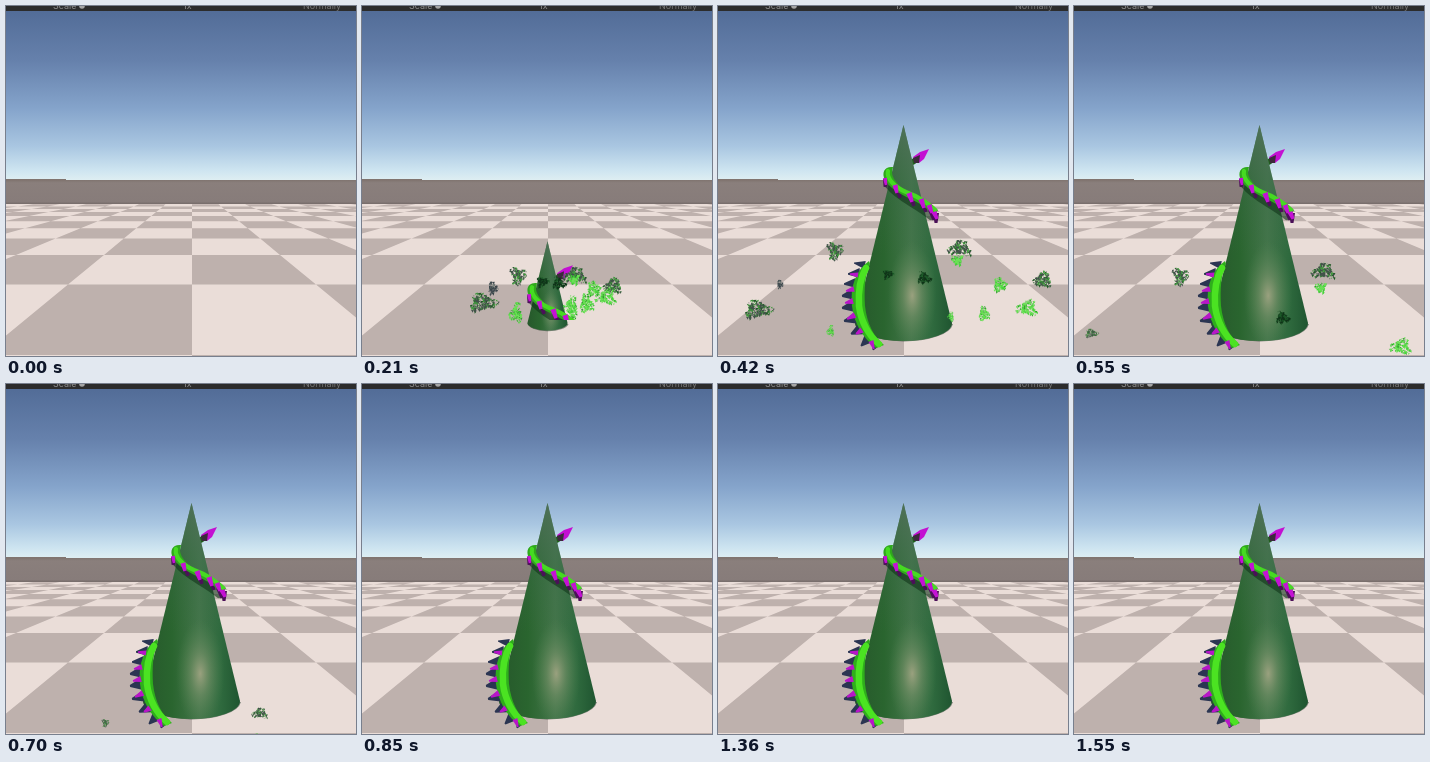
These frames come from a looping animation (350 px wide and 350 px high, 1.58 s). An HTML page:

```html
<!DOCTYPE html>
<html lang="en">
<head>
<meta charset="utf-8">
<title>Thorn cone</title>
<style>
html, body { margin: 0; width: 100%; height: 100%; overflow: hidden; background: #2b2b2b; }
svg { display: block; width: 100vw; height: 100vh; }
text { font: 9px Inter, Arial, sans-serif; fill: #8e8e8e; }
</style>
</head>
<body>
<svg viewBox="0 0 350 350">
  <defs>
    <linearGradient id="sky" x1="0" y1="0" x2="0" y2="1">
      <stop offset="0" stop-color="#526c97"/>
      <stop offset=".3" stop-color="#6681ac"/>
      <stop offset=".58" stop-color="#85a4cb"/>
      <stop offset=".8" stop-color="#a9c6e1"/>
      <stop offset=".94" stop-color="#cde4f0"/>
      <stop offset="1" stop-color="#deeef2"/>
    </linearGradient>
    <linearGradient id="wall" x1="0" y1="0" x2="0" y2="1">
      <stop offset="0" stop-color="#80746f"/>
      <stop offset=".12" stop-color="#8a7f7c"/>
      <stop offset=".9" stop-color="#877c7a"/>
      <stop offset="1" stop-color="#756b69"/>
    </linearGradient>
    <linearGradient id="side" x1="0" x2="1" y1="0" y2="0">
      <stop offset="0" stop-color="#26582b"/>
      <stop offset=".3" stop-color="#2a652f"/>
      <stop offset=".58" stop-color="#43754a"/>
      <stop offset=".8" stop-color="#2f6a3e"/>
      <stop offset="1" stop-color="#1f5530"/>
    </linearGradient>
    <linearGradient id="tip" x1="0" x2="0" y1="0" y2="1">
      <stop offset="0" stop-color="#55705f" stop-opacity=".75"/>
      <stop offset=".35" stop-color="#3f6b4d" stop-opacity=".25"/>
      <stop offset=".6" stop-color="#3f6b4d" stop-opacity="0"/>
    </linearGradient>
    <radialGradient id="shine" cx=".59" cy=".79" r=".25">
      <stop offset="0" stop-color="#b0ac8c" stop-opacity=".8"/>
      <stop offset=".4" stop-color="#8f9f78" stop-opacity=".42"/>
      <stop offset="1" stop-color="#5f8f5c" stop-opacity="0"/>
    </radialGradient>
    <clipPath id="ground"><rect id="cut" x="0" y="0" width="350" height="350"/></clipPath>
  </defs>

  <rect y="4" width="350" height="170" fill="url(#sky)"/>
  <rect y="174" width="350" height="24" fill="url(#wall)"/>
  <rect y="173" width="60" height="1.2" fill="#80746f"/>
  <rect y="198" width="350" height="152" fill="#eaddd8"/>
  <path id="tiles" fill="#beb1ad"/>

  <g id="plant">
    <g clip-path="url(#ground)"><g id="back"></g></g>
    <path id="shade" fill="#263b2c" opacity=".55"/>
    <path class="cone" fill="url(#side)"/>
    <path class="cone" fill="url(#tip)"/>
    <path class="cone" fill="url(#shine)"/>
    <g clip-path="url(#ground)"><g id="front"></g></g>
  </g>
  <g id="debris"></g>

  <rect width="350" height="5" fill="#2c2c2c"/>
  <text x="47" y="2.5">Scale</text>
  <circle cx="76" cy="0" r="2.8" fill="#a5a5a5"/>
  <text x="177" y="2.5">1x</text>
  <text x="297" y="2.5" opacity=".75">Normally</text>
</svg>
<script>
const LOOP = 1580, RISE_AT = 90, RISE_MS = 297, BURST_AT = 120;
const $ = id => document.getElementById(id);
const clamp = v => Math.max(0, Math.min(1, v));

function add(parent, tag, attrs) {
  const el = document.createElementNS('http://www.w3.org/2000/svg', tag);
  for (const k in attrs) el.setAttribute(k, attrs[k]);
  parent.appendChild(el);
  return el;
}

let seed = 11;
function rnd() {
  seed = (seed * 16807) % 2147483647;
  return seed / 2147483647;
}

// Checkerboard floor in perspective
function buildFloor() {
  const vx = 186, vy = 176.5, slope = 124 / 102;
  const depth = n => 1 / (1 / 102 + n * 0.00401);
  let d = '';
  for (let n = -2; n < 9; n++) {
    const a = depth(n), b = Math.max(21.5, depth(n + 1));
    for (let k = -12; k < 12; k++) {
      if ((n + k) & 1) continue;
      const x = (i, z) => (vx + i * slope * z).toFixed(1);
      d += `M${x(k, a)} ${vy + a}L${x(k + 1, a)} ${vy + a}L${x(k + 1, b)} ${vy + b}L${x(k, b)} ${vy + b}Z`;
    }
  }
  $('tiles').setAttribute('d', d);
}

// Each thorn: base x, base y, direction x, direction y, half width; tip 0 is sharp, 1 is blunt
function thorns(parent, fill, tip, list) {
  const d = list.map(([x, y, dx, dy, w]) => {
    const m = Math.hypot(dx, dy), px = -dy / m * w, py = dx / m * w;
    const ex = x + dx, ey = y + dy;
    return `M${x + px} ${y + py}L${ex + px * tip} ${ey + py * tip}L${ex - px * tip} ${ey - py * tip}L${x - px} ${y - py}Z`;
  }).join('');
  add(parent, 'path', { d, fill });
}

function stroke(parent, d, color, width, opacity = 1) {
  add(parent, 'path', {
    d, stroke: color, fill: 'none', 'stroke-width': width, 'stroke-linecap': 'round', opacity
  });
}

function buildVine() {
  const back = $('back'), front = $('front');
  add(back, 'path', { d: 'M188 158L198 150L203 153L197 158L189 162Z', fill: '#20601c' });
  add(back, 'path', { d: 'M195 151L202 146L211 143L206 153L201 157L197 155Z', fill: '#c310d2' });
  add(back, 'path', { d: 'M195 152L202 149L201 157L196 157Z', fill: '#3c2a3c' });

  stroke(front, 'M171 179C181 192 199 198 213 210', '#12351a', 8, 0.6);
  thorns(front, '#4b1058', 0.5, [[168, 173, -1, 8, 3], [180, 184, 2, 8, 3], [193, 191, 3, 9, 3],
    [205, 197, 3, 9, 3], [213, 204, 3, 10, 3], [218, 207, 0, 10, 3]]);
  add(front, 'path', {
    d: 'M175 161C167 160 163 166 167 174C174 186 190 191 204 199L217 209L220 204C210 193 194 190 184 182C178 177 174 171 174 166Z',
    fill: '#2fa81c'
  });
  stroke(front, 'M170 165C168 173 178 182 188 186C199 190 209 196 217 204', '#46da22', 4.2);
  thorns(front, '#c412d4', 0.6, [[167, 172, 1, 7, 2], [177, 179, 2, 8, 2.6], [191, 187, 3, 9, 2.8],
    [203, 193, 3, 9, 2.8], [211, 199, 3, 8, 2.6], [216, 206, 3, 7, 2.6]]);

  thorns(front, '#2b3552', 0.15, [[147, 259, -11, -2, 4], [142, 267, -12, 1, 5], [138, 277, -12, 1, 5],
    [136, 288, -12, 2, 6], [136, 300, -12, 2, 6], [139, 312, -13, 3, 6], [143, 323, -10, 5, 6],
    [150, 333, -7, 7, 5], [158, 338, -3, 6, 4]]);
  add(front, 'path', {
    d: 'M151 255C138 264 132 280 134 300C136 318 146 333 158 342L166 339C156 331 149 318 147 300C146 283 147 268 152 258Z',
    fill: '#2fae1c'
  });
  stroke(front, 'M148 262C142 272 140 284 141 300C143 316 151 330 161 338', '#4be322', 6.5);
  thorns(front, '#b815c8', 0.3, [[140, 269, -8, -1, 2.4], [136, 283, -8, 2, 2.8], [135, 295, -8, 2, 3],
    [137, 309, -8, 4, 3], [144, 324, -6, 4, 3], [153, 335, 3, 8, 2.6]]);
}

// x, y: place 210 ms into the burst; drop: fall in the next 220 ms
const CLUMPS = [
  { x: 64, y: 295, w: 32, h: 20, tone: 0, drop: 32, life: 592 },
  { x: 128, y: 245, w: 18, h: 20, tone: 0, drop: 25, life: 740 },
  { x: 83, y: 271, w: 11, h: 14, tone: 2, drop: 40, life: 480 },
  { x: 125, y: 315, w: 14, h: 22, tone: 1, drop: 30, life: 470 },
  { x: 232, y: 244, w: 26, h: 18, tone: 0, drop: 21, life: 760 },
  { x: 225, y: 302, w: 15, h: 26, tone: 1, drop: 30, life: 460 },
  { x: 265, y: 271, w: 15, h: 17, tone: 1, drop: 40, life: 510 },
  { x: 301, y: 267, w: 20, h: 18, tone: 0, drop: 40, life: 520 },
  { x: 252, y: 298, w: 15, h: 21, tone: 1, drop: 36, life: 490 },
  { x: 288, y: 289, w: 24, h: 18, tone: 1, drop: 51, life: 760 },
  { x: 230, y: 252, w: 12, h: 12, tone: 1, drop: 29, life: 720 },
  { x: 202, y: 263, w: 14, h: 14, tone: 3, drop: 48, life: 720 },
  { x: 172, y: 261, w: 12, h: 12, tone: 3, drop: 45, life: 500 }
];
const TONES = [
  ['#1f5a25', '#3f9a3c', '#42514a'],
  ['#2f9a2c', '#46d63a', '#6be055'],
  ['#50585c', '#77817c', '#39444a'],
  ['#123f1c', '#1c5a28', '#0f3318']
];

function buildDebris() {
  for (const c of CLUMPS) {
    c.el = add($('debris'), 'g', {});
    for (const fill of TONES[c.tone]) {
      let d = '';
      for (let i = 0; i < 10 + c.w * c.h / 9; i++) {
        const a = rnd() * 6.283, r = Math.sqrt(rnd()) / 2;
        const wave = 0.8 + 0.25 * Math.sin(a * 3 + c.x);
        const x = Math.cos(a) * r * c.w * wave, y = Math.sin(a) * r * c.h * wave;
        const s = 0.9 + rnd() * 1.9;
        d += `M${x.toFixed(1)} ${y.toFixed(1)}l${s.toFixed(1)} ${(rnd() * 1.4 - 0.7).toFixed(1)}l${(-s * rnd()).toFixed(1)} ${s.toFixed(1)}z`;
      }
      add(c.el, 'path', { d, fill });
    }
  }
}

function drawDebris(t) {
  const age = t - BURST_AT, ox = 188, oy = 305;
  const drag = (1 - Math.exp(-age / 211)) / (1 - Math.exp(-210 / 211));
  for (const c of CLUMPS) {
    const on = age > 0 && t < c.life;
    c.el.setAttribute('display', on ? 'inline' : 'none');
    if (!on) continue;
    // Parabola through launch point and both known heights
    const s1 = (c.y - oy) / 210, s2 = (c.y + c.drop - oy) / 430;
    const g = (s2 - s1) / 220, v = s1 - g * 210;
    const x = ox + (c.x - ox) * drag, y = oy + v * age + g * age * age;
    const size = clamp(age / 90) * clamp((c.life - t) / 90);
    c.el.setAttribute('transform', `translate(${x.toFixed(2)} ${y.toFixed(2)}) scale(${size.toFixed(3)})`);
  }
}

// The cone slides up through the floor, so its footprint widens as it rises
function drawPlant(t) {
  const off = 195 * (1 - clamp((t - RISE_AT) / RISE_MS));
  $('plant').setAttribute('display', t > RISE_AT ? 'inline' : 'none');
  const cx = 185.5, cy = 317, top = 119 + off;
  const w = (cy - top) / 198, rx = 48.5 * w, ry = 18 * w;
  const d = `M${cx} ${top}L${cx - rx} ${cy}A${rx} ${ry} 0 0 0 ${cx + rx} ${cy}Z`;
  document.querySelectorAll('.cone').forEach(p => p.setAttribute('d', d));
  $('shade').setAttribute('d', `M${cx - rx} ${cy}A${rx + 0.6} ${ry + 1} 0 0 0 ${cx + rx + 1} ${cy + 1}Z`);
  $('cut').setAttribute('height', 350 - 36 * clamp(off / 38));
  for (const id of ['back', 'front']) $(id).setAttribute('transform', `translate(0 ${off})`);
}

buildFloor();
buildVine();
buildDebris();

let start;
function frame(now) {
  if (start === undefined) start = now;
  const t = (now - start) % LOOP;
  drawPlant(t);
  drawDebris(t);
  requestAnimationFrame(frame);
}
requestAnimationFrame(frame);
</script>
</body>
</html>
```
